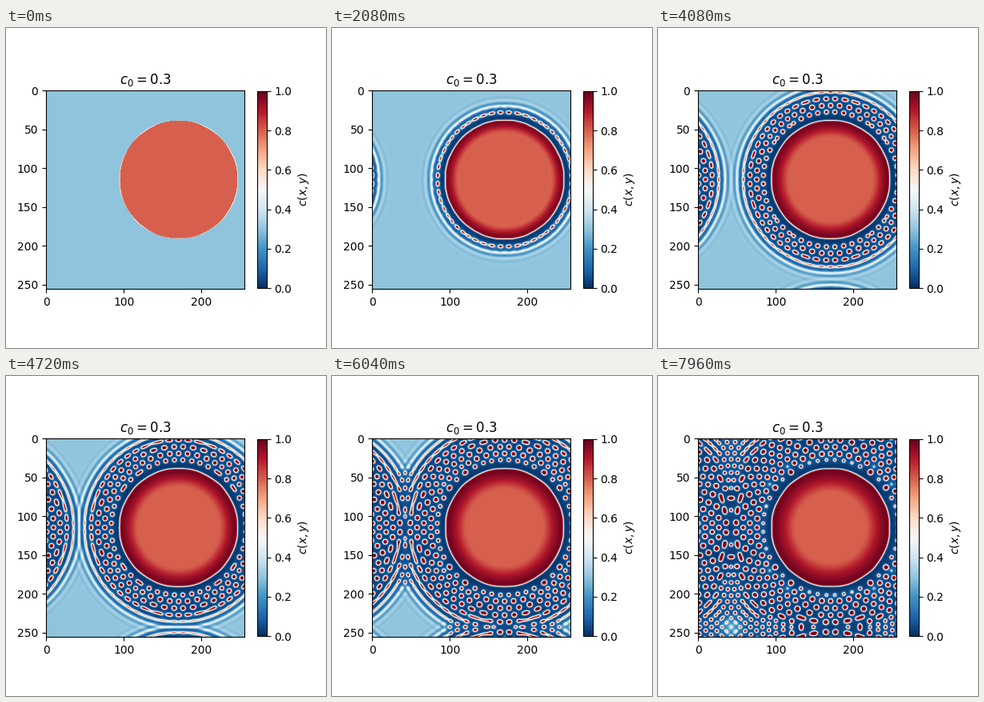
Recreate the animation shown at these times as a matplotlib script. Size 400 by 400 pixels, loop 8000 ms.

```python
import numpy as np
import matplotlib.pyplot as plt
from matplotlib.animation import FuncAnimation

# Cahn-Hilliard phase separation around a round seed, f(c) = W c^2 (1 - c)^2,
# solved on a periodic unit-spaced grid with a semi-implicit spectral scheme.
N = 256
W, M, KAPPA = 2.0, 1.0, 1.0
DT = 0.4
FRAMES, INTERVAL = 200, 40
C0, C_SEED = 0.3, 0.8
CX, CY, RADIUS = 170, 115, 76


def dfdc(c):
    return 2 * W * c * (1 - c) * (1 - 2 * c)


def seed():
    y, x = np.mgrid[:N, :N]
    inside = (x - CX) ** 2 + (y - CY) ** 2 <= RADIUS ** 2
    return np.where(inside, C_SEED, C0)


def simulate():
    kx = 2 * np.pi * np.fft.rfftfreq(N)
    ky = 2 * np.pi * np.fft.fftfreq(N)
    k2 = kx[None, :] ** 2 + ky[:, None] ** 2
    damping = 1 + DT * M * KAPPA * k2 ** 2

    c = seed()
    c_hat = np.fft.rfft2(c)
    fields = np.empty((FRAMES, N, N), dtype=np.float32)
    fields[0] = c
    for i in range(1, FRAMES):
        c_hat = (c_hat - DT * M * k2 * np.fft.rfft2(dfdc(c))) / damping
        c = np.fft.irfft2(c_hat, s=(N, N))
        fields[i] = c
    return fields


fields = simulate()

plt.rcParams["font.family"] = "DejaVu Sans"
fig, ax = plt.subplots(figsize=(4, 4), dpi=100)
image = ax.imshow(fields[0], cmap="RdBu_r", vmin=0, vmax=1)
fig.colorbar(image, ax=ax, label=r"$c(x,y)$", shrink=0.8)
ax.set_title(r"$c_0=0.3$")


def update(i):
    image.set_data(fields[i])
    return (image,)


anim = FuncAnimation(fig, update, frames=FRAMES, interval=INTERVAL,
                     repeat=True, repeat_delay=0)
plt.show()
```
